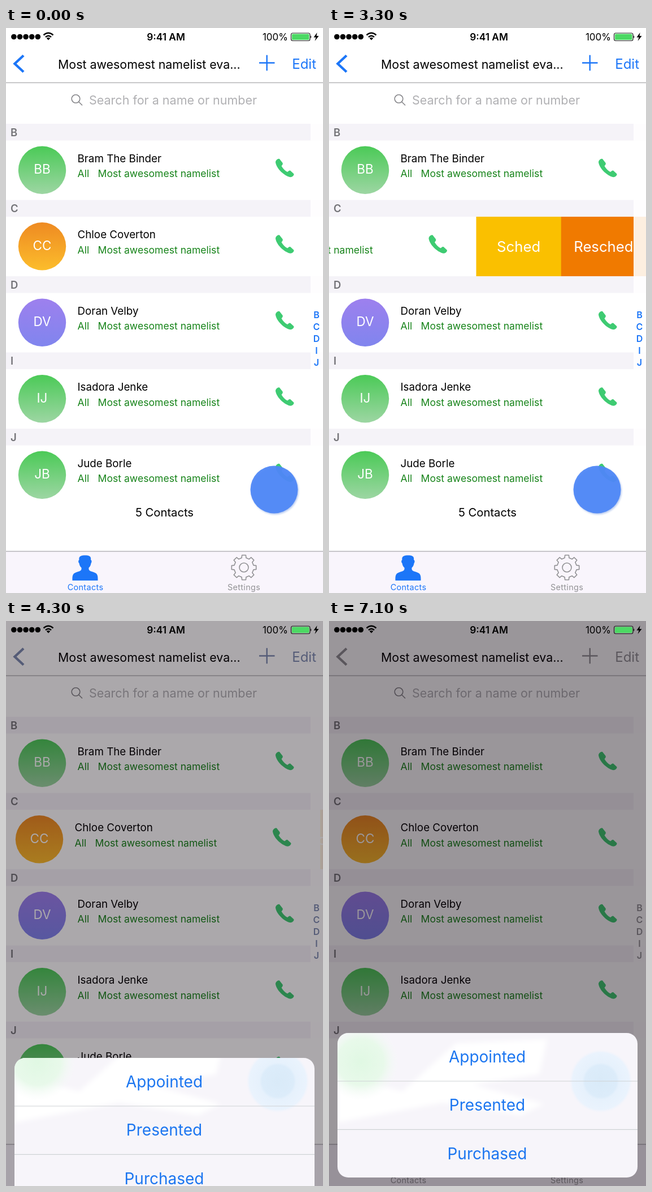
Animation of 561x997 px, one loop 7.2 s. Source, as an HTML page:

```html
<!DOCTYPE html>
<html lang="en">
<head>
<meta charset="utf-8">
<title>Contact list</title>
<style>
@property --x { syntax: "<length>"; inherits: true; initial-value: 0px; }
@property --y { syntax: "<length>"; inherits: true; initial-value: 270px; }
@property --dim { syntax: "<number>"; inherits: true; initial-value: 0; }
@property --tint { syntax: "<color>"; inherits: true; initial-value: #1c76f8; }

html, body { margin: 0; width: 100%; height: 100%; overflow: hidden; background: #fff; }
#stage {
  display: block; width: 561px; height: 997px;
  font-family: Inter, Roboto, sans-serif;
  animation: swipe 7.2s step-end infinite, present 7.2s step-end infinite;
}

/* Row drag: flick open, overshoot, settle, close on tap */
@keyframes swipe {
  0% { --x: 0px; }
  31.94% { --x: 24px; }
  33.33% { --x: 130px; }
  34.72% { --x: 265px; }
  36.11% { --x: 311px; }
  37.49% { --x: 306px; }
  38.88% { --x: 302px; }
  40.27% { --x: 300.5px; }
  58.33% { --x: 110px; }
  59.72% { --x: 5px; }
  61.11%, 100% { --x: 0px; }
}
/* Action sheet spring, with the screen dimming behind it */
@keyframes present {
  0% { --y: 270px; --dim: 0; --tint: #1c76f8; }
  58.33% { --y: 165px; --dim: .17; --tint: #4a80d2; }
  59.72% { --y: 44px; --dim: .34; --tint: #7c8bb0; }
  61.11% { --y: 11px; --dim: .39; --tint: #8b919f; }
  62.49% { --y: 2px; --dim: .41; --tint: #919298; }
  63.88%, 100% { --y: 0px; --dim: .41; --tint: #929296; }
}

.row, .btn1 { transform: translateX(calc(var(--x) * -1)); }
.btn2 { transform: translateX(calc(var(--x) * -.5)); }
.cap1 { transform: translateX(calc(var(--x) * -.75)); }
.cap2 { transform: translateX(calc(var(--x) * -.25)); }
.sheet { transform: translateY(var(--y)); }
.glow { transform: translateY(calc(var(--y) * -1)); }
.dim { opacity: var(--dim); fill: #0a010a; }
.tint { fill: var(--tint); }
.line { fill: none; stroke: var(--tint); }
.mid { text-anchor: middle; }
.head { font-size: 18.5px; font-weight: 600; fill: #737377; }
.name { font-size: 18.8px; }
.tag { font-size: 17.6px; fill: #17841a; }
.initials { font-size: 22.5px; fill: #fff; }
.cap { font-size: 25.7px; fill: #fff; }
.index { font-size: 16px; font-weight: 600; }
.tab { font-size: 14.4px; letter-spacing: .35px; }
.option { font-size: 28px; fill: #1c76f0; }
</style>
</head>
<body>
<svg id="stage" viewBox="0 0 561 997">
  <defs>
    <linearGradient id="green" x2="0" y2="1"><stop stop-color="#4bca57"/><stop offset="1" stop-color="#9dd6a3"/></linearGradient>
    <linearGradient id="orange" x2="0" y2="1"><stop stop-color="#ee8a22"/><stop offset="1" stop-color="#fcbd2c"/></linearGradient>
    <linearGradient id="purple" x2="0" y2="1"><stop stop-color="#9d80ee"/><stop offset="1" stop-color="#8085ee"/></linearGradient>
    <radialGradient id="mint"><stop stop-color="#e0f8e3"/><stop offset=".6" stop-color="#e8f9ea"/><stop offset="1" stop-color="#f6faf8" stop-opacity="0"/></radialGradient>
    <radialGradient id="sky">
      <stop stop-color="#d9eaf8"/><stop offset=".5" stop-color="#dcecfa"/><stop offset=".58" stop-color="#e6f1fc"/>
      <stop offset=".9" stop-color="#eaf3fd"/><stop offset="1" stop-color="#f3f4fb" stop-opacity="0"/>
    </radialGradient>
    <filter id="soft"><feGaussianBlur stdDeviation="4"/></filter>
    <filter id="shadow"><feGaussianBlur stdDeviation="1.6"/></filter>
    <clipPath id="card"><rect x="15" y="727" width="531" height="255" rx="19"/></clipPath>
    <path id="phone" fill="#3ecb72" d="M-16-10C-16-14-11.500-17.500-9-16L-3.500-9C-2.500-7-4-5-5.500-3.500C-3 1 1 5 5 7C7 5.500 8 4 10 4.500L16 10C18 12 13.500 17 9 16C-1 13.500-14.500 1-16-10Z"/>
  </defs>

  <rect width="561" height="997" fill="#fff"/>

  <path class="line" d="M31 48.500L15.500 63L31 77.500" stroke-width="4.400"/>
  <text x="92" y="72" font-size="21.4">Most awesomest namelist eva...</text>
  <path class="line" d="M448 61.500h27.500M461.700 47.800v27.500" stroke-width="2.400"/>
  <text class="tint" x="549" y="72" font-size="24" text-anchor="end">Edit</text>
  <path d="M0 96.500h561" stroke="#b5b5b7" stroke-width="1.300"/>
  <g fill="none" stroke="#858589" stroke-width="1.600"><circle cx="123.500" cy="125" r="7.300"/><path d="M129 130.500l6 6"/></g>
  <text x="147" y="135" font-size="21.5" fill="#b0b0b3">Search for a name or number</text>

  <g id="list"></g>
  <rect x="539" y="169" width="22" height="680" fill="#fff" opacity=".88"/>
  <g id="index"></g>
  <text class="mid" x="280.500" y="862" font-size="20.2">5 Contacts</text>

  <circle cx="476" cy="816.500" r="42" fill="#8aa9e6" opacity=".6" filter="url(#shadow)"/>
  <circle cx="474.500" cy="814.500" r="42" fill="#4c86f7" opacity=".92"/>

  <rect y="923" width="561" height="74" fill="#f9f5fc"/>
  <path d="M0 923.500h561" stroke="#b5b3b7" stroke-width="1.300"/>
  <path class="tint" d="M117.500 975C117 964 119 962 127 959.500C132 958 134 957 133.500 952.500C130.500 950 130 947 129.500 944.500C127.500 943 128 939 129.500 938.500C128 932 134 930.500 140 930.500C146 930.500 151.500 932 150 938.500C152 939 152 943 150.500 944.500C150 947 149.500 950 146.500 952.500C146 957 148 958 153 959.500C161 962 163 964 162.500 975Z"/>
  <text class="tab tint mid" x="140.500" y="992">Contacts</text>
  <g fill="none" stroke="#929295" stroke-width="1.600"><path id="gear" stroke-linejoin="round"/><circle cx="421" cy="952" r="8"/></g>
  <text class="tab mid" x="421" y="992" fill="#929295">Settings</text>

  <rect class="dim" width="561" height="997"/>

  <g id="dots"></g>
  <g fill="none" stroke="#000" stroke-width="2.400"><path d="M66.500 12.500Q75 5 83.500 12.500M70 16Q75 11.500 80 16"/></g>
  <path d="M71.800 18Q75 15.500 78.200 18L75 21.500Z"/>
  <text class="mid" x="283" y="21.500" font-size="17.3" font-weight="600">9:41 AM</text>
  <text x="499" y="21.500" font-size="17" text-anchor="end">100%</text>
  <rect x="504.500" y="9" width="33.500" height="13.500" rx="3" fill="none" stroke="#222" stroke-width="1.200"/>
  <rect x="506" y="10.500" width="30.500" height="10.500" rx="1.600" fill="#4cd964"/>
  <path d="M539 13q2.500 2.700 0 5.400ZM550.500 8l-6 8.500h4l-2 6.500l7-9h-4Z"/>

  <g class="sheet" clip-path="url(#card)">
    <rect x="15" y="727" width="531" height="255" fill="#f7f5fa"/>
    <g class="glow">
      <path d="M225 745L386 738L372 800L255 818L380 852L340 872L200 850L15 885V800L130 830Z" fill="#fff" filter="url(#soft)"/>
      <circle cx="56" cy="778" r="68" fill="url(#mint)"/>
      <circle cx="481" cy="812" r="56" fill="url(#sky)"/>
    </g>
    <path d="M15 812h531M15 897.300h531" stroke="#cfd3d5" stroke-width="1.200"/>
    <g id="options"></g>
  </g>
</svg>
<script>
const people = [
  ["Bram The Binder", "BB", "green"],
  ["Chloe Coverton", "CC", "orange"],
  ["Doran Velby", "DV", "purple"],
  ["Isadora Jenke", "IJ", "green"],
  ["Jude Borle", "JB", "green"]
];
const fill = (id, html) => { document.getElementById(id).innerHTML = html; };

const buttons = `
  <rect class="btn1" x="561" y="333" width="320" height="105" fill="#fac000"/>
  <text class="cap cap1 mid" x="561" y="395">Sched</text>
  <rect class="btn2" x="561" y="333" width="320" height="105" fill="#f07a00"/>
  <text class="cap cap2 mid" x="561" y="395">Resched</text>`;

const section = ([name, initials, paint], i) => {
  const y = 169 + i * 134.5, open = i === 1;
  return `
    <rect y="${y}" width="561" height="29.5" fill="#f5f3f8"/>
    <text class="head" x="8" y="${y + 21.5}">${initials[0]}</text>
    <g class="${open ? "row" : ""}">
      <circle cx="64" cy="${y + 81.8}" r="42.2" fill="url(#${paint})"/>
      <text class="initials mid" x="64" y="${y + 88}">${initials}</text>
      <text class="name" x="126.5" y="${y + 67.5}">${name}</text>
      <text class="tag" x="126.5" y="${y + 94}">All</text>
      <text class="tag" x="162.5" y="${y + 94}">Most awesomest namelist</text>
      <use href="#phone" x="493" y="${y + 78}"/>
    </g>${open ? buttons : ""}`;
};

fill("list", people.map(section).join(""));
fill("index", people.map((p, i) =>
  `<text class="index tint mid" x="549.5" y="${511.5 + i * 21}">${p[1][0]}</text>`).join(""));
fill("options", ["Appointed", "Presented", "Purchased"].map((label, i) =>
  `<text class="option mid" x="280" y="${779.2 + i * 85.2}">${label}</text>`).join(""));
fill("dots", [0, 1, 2, 3, 4].map(i =>
  `<circle cx="${13.9 + i * 10.6}" cy="15.5" r="4.8"/>`).join(""));

// Eight flat teeth around the hub
const teeth = [];
for (let k = 0; k < 8; k++) {
  for (const [r, a] of [[17.5, -13], [22, -9], [22, 9], [17.5, 13]]) {
    const t = (k * 45 + a) * Math.PI / 180;
    teeth.push(`${(421 + r * Math.sin(t)).toFixed(1)} ${(952 - r * Math.cos(t)).toFixed(1)}`);
  }
}
document.getElementById("gear").setAttribute("d", `M${teeth.join("L")}Z`);
</script>
</body>
</html>
```
